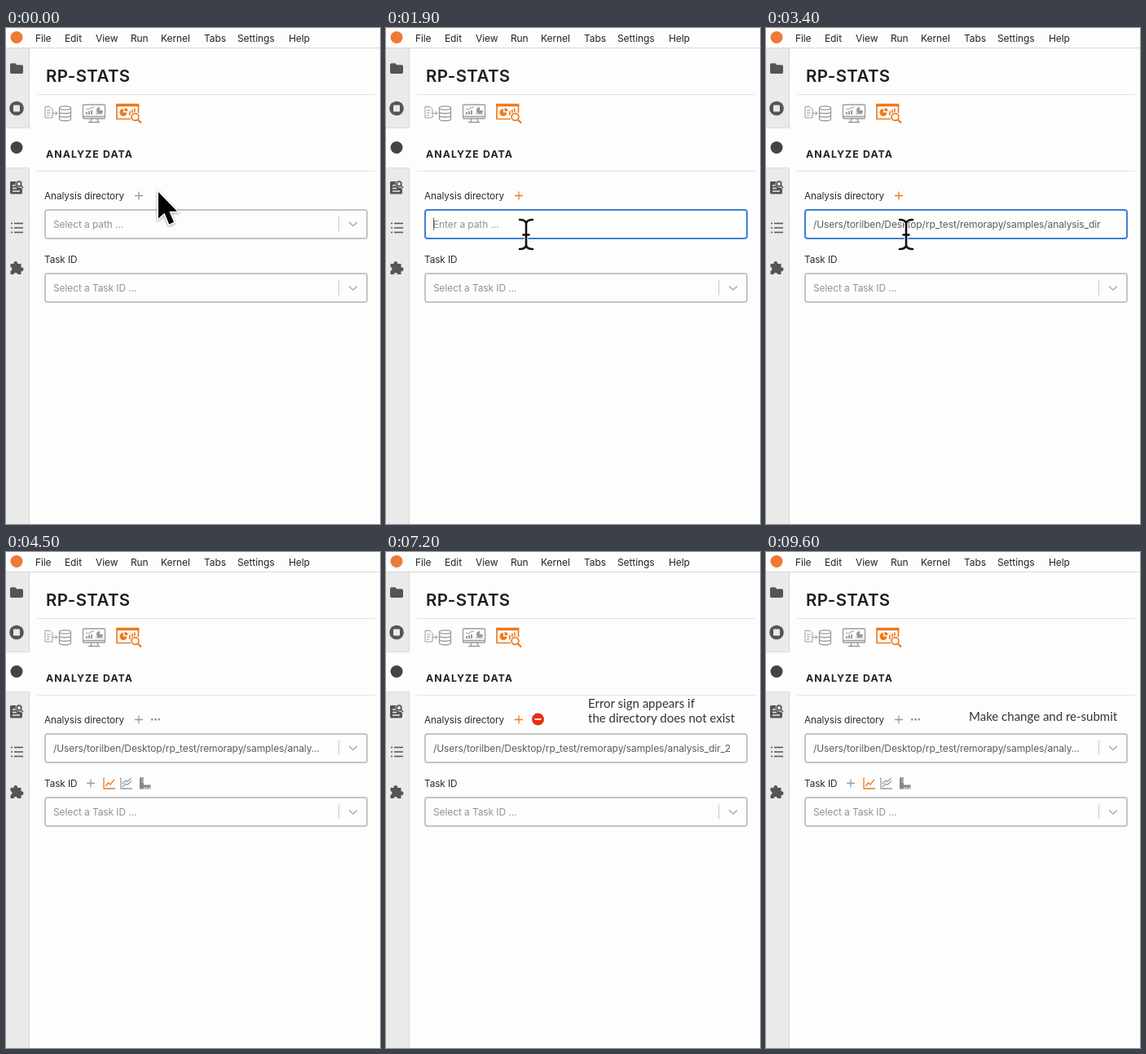
Animation of 459 by 608 pixels, one loop 9700 ms. Source, as an HTML page:

```html
<!DOCTYPE html>
<html lang="en">
<head>
<meta charset="utf-8">
<title>Analyze data</title>
<style>
  html, body { margin: 0; width: 100%; height: 100%; overflow: hidden; background: #fefdfe; }
  svg { display: block; width: 459px; height: 608px; }
  text { font: 12px Inter, sans-serif; letter-spacing: -.1px; fill: #5c5c5c; white-space: pre; }
  .menu text { fill: #222; }
  .label { font-size: 11.8px; fill: #2c2c2c; }
  .hint { fill: #929292; }
  .title { font: 600 20.5px Inter, sans-serif; letter-spacing: .4px; fill: #1f1f1f; }
  .sub { font: 700 12.3px Inter, sans-serif; letter-spacing: 1.1px; fill: #222; }
  .cap text { font: 15px Lato, sans-serif; letter-spacing: 0; fill: #333; }
  .line { fill: none; stroke: currentColor; stroke-width: 1.3; }
  .thin { stroke-width: 1; }
  .thick { stroke-width: 1.7; }
  .solid { fill: currentColor; }
  .gray { color: #9a9a9a; }
  .dark { color: #555; }
  .orange { color: #ee7b1d; }
</style>
</head>
<body>
<svg viewBox="0 0 459 608">
  <defs>
    <g id="drop" fill="none">
      <path d="M408.5 231V249" stroke="#c8c8c8"/>
      <path d="M421 238l5 4.6 5-4.6" stroke="#b8b8b8" stroke-width="1.8"/>
    </g>
    <path id="plus" class="line" d="M-5 0H5M0-5V5"/>
    <path id="axes" class="line" d="M-6.5-7V6.5H7.5"/>
    <path id="ibeam" d="M-8-18q7 0 8 4.5q1-4.5 8-4.5M-8 18q7 0 8-4.5q1 4.5 8 4.5M0-13.5V13.5M-3.5 .5H3.5"/>
  </defs>

  <rect width="459" height="608" fill="#fefdfe"/>
  <rect y="25" width="29" height="583" fill="#ebeaeb"/>
  <path d="M28.5 25V608M0 24.5H459" stroke="#d8d7d8"/>
  <path d="M0 123H29V171H0Z" fill="#fefdfe"/>
  <path d="M0 122.5H29M0 171.5H29" stroke="#dddcdd"/>
  <circle cx="13" cy="11.5" r="7.5" fill="#ee7b35"/>
  <g class="menu" id="menu"></g>

  <g class="dark">
    <path class="solid" d="M5 45q0-1.8 1.8-1.8h4.6l1.8 2h6q1.8 0 1.8 1.8v7.2q0 1.8-1.8 1.8H6.8q-1.8 0-1.8-1.8z"/>
    <circle class="solid" cx="13" cy="98.5" r="8.8"/>
    <rect x="9" y="94.5" width="8" height="8" rx=".8" fill="#ebeaeb"/>
    <circle cx="13" cy="146.5" r="7.5" fill="#444"/>
    <path class="solid" d="M6 188h6.500a5 5 0 0 0 5.500 7.500l2 2V202q0 1.500-1.500 1.500h-12Q5 203.500 5 202V189.500Q5 188 6 188Z"/>
    <path d="M8 193h3.500M8 196.500h5M8 200h9" stroke="#ebeaeb" stroke-width="1.3"/>
    <circle class="line thick" cx="16" cy="191" r="2.8"/>
    <path class="line thick" d="M18 193l3 3M6 239.500h2m2 0h11M6 245h2m2 0h11M6 250.500h2m2 0h11"/>
    <path class="solid" d="M5.500 289h4a2.400 2.400 0 1 1 4.600 0h4.400v4.300a2.500 2.500 0 1 1 0 4.900V302h-4.200a2.500 2.500 0 0 0-4.900 0H5.500v-4.200a2.500 2.500 0 0 0 0-4.900z"/>
  </g>

  <text class="title" x="49" y="65.5">RP-STATS</text>
  <path d="M38 81.5H453M38 175.5H453" stroke="#e4e3e4"/>
  <text class="sub" x="49" y="158.5">ANALYZE DATA</text>

  <g class="gray">
    <path class="line thin" d="M48 96.500h6l3 3v10.500h-9zM50 101h4.500M50 104h4.500M50 107h3M57 104.500h6m-2.500-2.500 2.500 2.500-2.500 2.500"/>
    <path class="line" d="M65.500 98v13.500c0 3 14 3 14 0V98M65.500 102.500c0 3 14 3 14 0M65.500 107c0 3 14 3 14 0"/>
    <ellipse class="line" cx="72.500" cy="98" rx="7" ry="2.200"/>
    <rect class="line" x="94.500" y="94" width="27" height="17" rx="1"/>
    <path class="line" d="M95 108.500h26M105 111l-1 4m8-4 1 4M101 115.500h14"/>
    <path class="line thin" d="M98 99l3 1 3-2 4-1M110 105h9"/>
    <path class="solid" d="M98 103h2v3h-2zM101 102h2v4h-2zM104 101h2v5h-2zM115 97v4h4a4 4 0 1 1-4-4z"/>
  </g>
  <g class="orange">
    <path class="line thick" d="M153 111.500H136V93.700H162.500V104"/>
    <path class="solid" d="M135.200 93h28v3.200h-28zM144 99v4.500h4.500a4.500 4.500 0 1 1-4.500-4.500zM145.500 98a4 4 0 0 1 4 4h-4zM151 102h1.700v5H151zM154 100h1.700v4H154zM157 98.500h1.700v4.500H157z"/>
    <circle class="line thick" cx="158.500" cy="109" r="4.400"/>
    <path class="line" d="M161.700 112.200l4.300 4.300" style="stroke-width:2.200"/>
  </g>

  <text class="label" x="47" y="209.5">Analysis directory</text>
  <use href="#plus" x="163" y="205.5" id="add"/>
  <g id="error">
    <circle cx="186.5" cy="205" r="7.5" fill="#e5310f"/>
    <path d="M182.5 205h8" stroke="#fff" stroke-width="1.8"/>
  </g>
  <rect id="box" x="48" y="223" width="395" height="35" rx="3" fill="#fefdfe" stroke-width="2"/>
  <text id="path" x="58" y="244.8"></text>
  <path id="caret" d="M0 232.500V248" stroke="#666"/>
  <use href="#drop" id="dirDrop"/>

  <text class="label" x="47" y="288.3">Task ID</text>
  <rect x="48" y="301" width="395" height="35" rx="3" fill="#fefdfe" stroke="#c6c5c6" stroke-width="2"/>
  <text class="hint" x="58" y="323.3">Select a Task ID ...</text>
  <use href="#drop" y="78.500"/>

  <g id="tasks" class="gray">
    <path class="solid" d="M178 204h2.500v2.500H178zM182.300 204h2.500v2.500h-2.500zM186.600 204h2.500v2.500h-2.500z"/>
    <use href="#plus" x="104" y="283.5"/>
    <g class="orange">
      <use href="#axes" x="126.5" y="283.5"/>
      <path class="line" d="M122 287l3.500-4 2.500 2 5-6"/>
    </g>
    <use href="#axes" x="147.5" y="283.5"/>
    <path class="line" d="M143 284l4-4 2 1.500 4.500-4.500M143 288l4-4 2 1.500 5-5"/>
    <path fill="#858585" d="M164 276.500h5v9h8.500v5H164z"/>
    <path d="M166.500 279h2.500M166.500 282h2.500M170 288v2.500M173 288v2.500M176 288v2.500" stroke="#fff"/>
  </g>

  <g class="cap">
    <g id="cap0"><text x="203" y="192">Click on the + button</text><text x="205" y="210">to enable editing mode</text></g>
    <g id="cap1"><text x="248" y="191">Error sign appears if</text><text x="248" y="209">the directory does not exist</text></g>
    <g id="cap2"><text x="249" y="207">Make change and re-submit</text></g>
  </g>

  <g id="arrow" style="filter:drop-shadow(0 1px 1.5px #0006)">
    <path d="M0 0V32.500L7.500 25.800 13.200 39.500 19 37 13.300 23.800H23Z" stroke="#fff" stroke-width="3" paint-order="stroke"/>
  </g>
  <g id="beam" fill="none" stroke-linecap="round">
    <use href="#ibeam" stroke="#fff" stroke-width="4.6"/>
    <use href="#ibeam" stroke="#111" stroke-width="2.6"/>
  </g>
</svg>
<script>
const LOOP = 9700;
const DIR = "/Users/torilben/Desktop/rp_test/remorapy/samples/analysis_dir";
const SHORT = DIR.slice(0, -7) + "...";
const $ = id => document.getElementById(id);

const MENU = { File: 36, Edit: 72, View: 110, Run: 153, Kernel: 190, Tabs: 243, Settings: 284, Help: 347 };
$("menu").innerHTML = Object.entries(MENU).map(([s, x]) => `<text x="${x}" y="16.5">${s}</text>`).join("");

// Spans in ms
const EDIT = [[700, 4400], [5250, 8700]];
const FOCUS = [[1500, 4400], [6050, 6900]];
const TASKS = [[4400, 5250], [8700, LOOP]];
const ERROR = [[6900, 8700]];
// Fade in from, to; fade out from, to
const CAPS = [[300, 700, 1200, 1500], [6950, 7200, 7600, 7850], [7900, 8200, LOOP, LOOP + 1]];
// Time, x, y, pointer shape
const MOVES = [
  [0, 187, 201, "arrow"], [100, 187, 201, "arrow"], [400, 162, 205, "arrow"], [750, 162, 205, "arrow"],
  [850, 168, 224, "beam"], [1000, 172, 240.5, "beam"], [1050, 172, 240.5, "beam"], [1300, 172, 253, "beam"],
  [3800, 172, 253, ""], [5000, 172, 225, "arrow"], [5150, 162, 205, "arrow"], [5300, 162, 205, "arrow"],
  [5550, 441, 275.5, "arrow"], [5900, 441, 275.5, "arrow"], [6000, 436, 242, "beam"], [6300, 436, 242, ""]
];

const within = (spans, t) => spans.some(([a, b]) => t >= a && t < b);
const ramp = (t, a, b) => Math.min(1, Math.max(0, (t - a) / (b - a)));
const ease = k => k * k * (3 - 2 * k);
const show = (id, on) => $(id).setAttribute("visibility", on ? "visible" : "hidden");

function fieldText(t) {
  if (t < 4400) return DIR.slice(0, Math.floor(ramp(t, 2400, 3300) * DIR.length));
  const n = t < 7000 ? (t >= 6400) + (t >= 6600) : (t < 8000) + (t < 8150);
  return DIR + "_2".slice(0, n);
}

function drawField(t) {
  const edit = within(EDIT, t), focus = within(FOCUS, t);
  const text = fieldText(t), node = $("path");
  const empty = !text;
  node.textContent = edit ? text || "Enter a path ..." : empty ? "Select a path ..." : SHORT;
  node.setAttribute("class", empty ? "hint" : "");
  $("box").setAttribute("stroke", focus ? "#3c82d2" : "#c6c5c6");
  $("add").setAttribute("class", edit ? "orange" : "gray");
  show("dirDrop", !edit);
  show("caret", focus && (t - 1500) % 1000 < 500);
  if (focus) {
    const x = empty ? 58.5 : 59 + node.getComputedTextLength();
    $("caret").setAttribute("transform", `translate(${x})`);
  }
}

function drawPointer(t) {
  let i = MOVES.length - 1;
  while (MOVES[i][0] > t) i--;
  const a = MOVES[i], b = MOVES[i + 1] || a;
  const k = a === b ? 0 : ease(ramp(t, a[0], b[0]));
  const at = j => a[j] + (b[j] - a[j]) * k;
  for (const id of ["arrow", "beam"]) {
    show(id, a[3] === id);
    $(id).setAttribute("transform", `translate(${at(1)} ${at(2)})`);
  }
}

function draw(t) {
  drawField(t);
  show("tasks", within(TASKS, t));
  show("error", within(ERROR, t));
  CAPS.forEach(([a, b, c, d], i) => $("cap" + i).setAttribute("opacity", ramp(t, a, b) - ramp(t, c, d)));
  drawPointer(t);
}

const start = performance.now();
function tick() {
  draw((performance.now() - start) % LOOP);
  requestAnimationFrame(tick);
}
tick();
</script>
</body>
</html>
```
